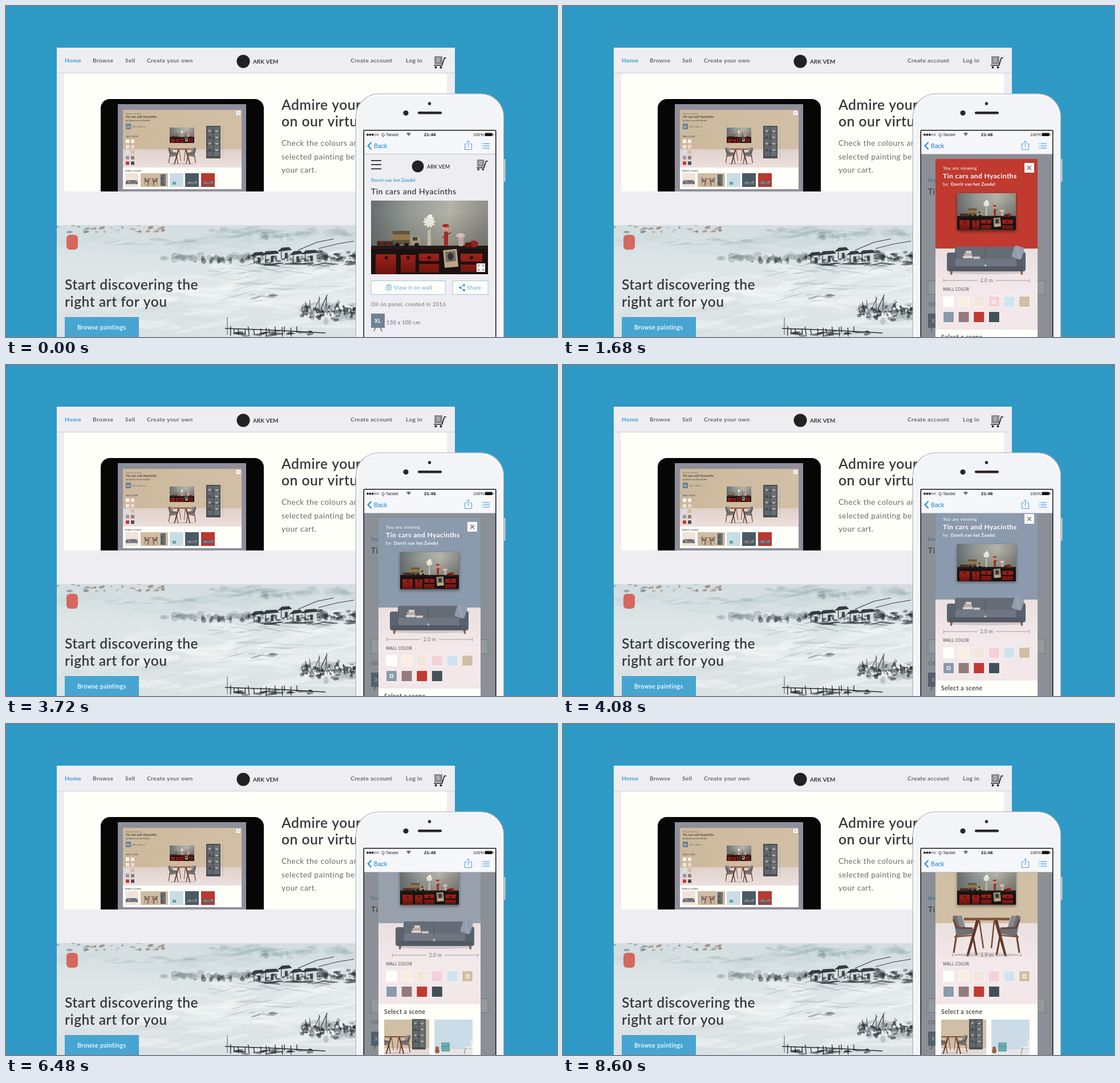
These frames come from a looping animation (966x580 px, 8.64 s). An HTML page with a canvas:

```html
<!DOCTYPE html>
<html lang="en">
<head>
<meta charset="utf-8">
<title>Art shop preview</title>
<style>
html, body { margin: 0; width: 100%; height: 100%; overflow: hidden; background: #2f9ac6; }
canvas { display: block; width: 966px; height: 580px; }
</style>
</head>
<body>
<canvas id="stage" width="966" height="580"></canvas>
<script>
const W = 966, H = 580, LOOP = 8640;
const BRAND = 'ARK VEM', ARTIST = 'Dorrit van het Zandel', TITLE = 'Tin cars and Hyacinths';
const SANS = 'Lato, sans-serif', SYSTEM = '"Liberation Sans", sans-serif';
const PAGE = '#ededf2', IVORY = '#fffff9', BLUE = '#3a9bd0', LINK = '#57a6d8';
const RED = [192, 58, 48], PINK = [243, 209, 216], SLATE = [139, 154, 173], TAN = [208, 191, 164];
const SWATCHES = ['#fffffa', '#fbeee0', '#f4e5dd', '#f3d1d8', '#cfe4ef', '#d0bfa4',
  '#8b9aad', '#957a7c', '#c03a30', '#444f58'];

const stage = document.getElementById('stage').getContext('2d');
let g = stage;

function newLayer() {
  const c = document.createElement('canvas');
  c.width = W; c.height = H;
  return c.getContext('2d');
}
function rect(x, y, w, h, fill, r = 0) {
  g.fillStyle = fill;
  g.beginPath();
  g.roundRect(x, y, w, h, r);
  g.fill();
}
function frame(x, y, w, h, color, lw = 1, r = 0) {
  g.strokeStyle = color;
  g.lineWidth = lw;
  g.beginPath();
  g.roundRect(x, y, w, h, r);
  g.stroke();
}
function oval(x, y, rx, ry, fill, turn = 0) {
  g.fillStyle = fill;
  g.beginPath();
  g.ellipse(x, y, rx, ry, turn, 0, 7);
  g.fill();
}
function trace(p) {
  g.beginPath();
  for (let i = 0; i < p.length; i += 2) g.lineTo(p[i], p[i + 1]);
}
function line(color, lw, ...p) {
  g.strokeStyle = color;
  g.lineWidth = lw;
  trace(p);
  g.stroke();
}
function poly(fill, ...p) {
  g.fillStyle = fill;
  trace(p);
  g.fill();
}
function text(s, x, y, size, color, weight = 400, gap = 0.035, family = SANS) {
  g.font = `${weight} ${size}px ${family}`;
  g.letterSpacing = size * gap + 'px';
  g.fillStyle = color;
  g.fillText(s, x, y);
}
function fade(x0, y0, x1, y1, ...colors) {
  const f = g.createLinearGradient(x0, y0, x1, y1);
  colors.forEach((c, i) => f.addColorStop(i / (colors.length - 1), c));
  return f;
}
function at(x, y, s, draw) {
  g.save();
  g.translate(x, y);
  g.scale(s, s);
  draw();
  g.restore();
}
function clip(x, y, w, h, draw) {
  g.save();
  g.beginPath();
  g.rect(x, y, w, h);
  g.clip();
  draw();
  g.restore();
}
const ease = (t, a, b) => {
  const p = Math.min(1, Math.max(0, (t - a) / (b - a)));
  return p * p * (3 - 2 * p);
};
const mix = (a, b, p) => a.map((v, i) => v + (b[i] - v) * p);
const rgb = c => `rgb(${c.map(Math.round)})`;
function seeded(s) {
  return () => (s = (s * 16807) % 2147483647) / 2147483647;
}

function cart() {
  rect(1, 0, 14, 14, '#8b8b8d');
  text('0', 5, 10, 9, '#fff', 400, 0);
  line('#222', 1.7, 22, 3, 18.5, 3, 14.5, 16, 0, 16);
  oval(3.5, 19.5, 1.9, 1.9, '#222');
  oval(12.5, 19.5, 1.9, 1.9, '#222');
}

// Still life, 205 x 129
function photo() {
  clip(0, 0, 205, 129, () => {
    rect(0, 0, 205, 129, fade(0, 0, 205, 40, '#656c6e', '#959a95', '#b3b3a7', '#8a8984'));
    rect(0, 0, 205, 82, fade(0, 20, 0, 82, 'rgba(60,60,55,0)', 'rgba(60,60,55,.3)'));
    rect(0, 82, 205, 47, '#191211');
    const red = fade(0, 90, 0, 129, '#a3241a', '#6a130e');
    rect(8, 94, 36, 35, red);
    rect(52, 95, 26, 31, red);
    rect(84, 93, 35, 13, red);
    rect(84, 111, 35, 15, red);
    rect(157, 93, 38, 14, red);
    rect(157, 112, 38, 13, red);
    for (const x of [27, 65, 102, 176]) oval(x, 100, 3, 3, '#2b0f0c');
    rect(0, 79, 205, 6, '#231917');
    for (let i = 0; i < 5; i++) oval(14 + i * 6, 75, 4, 4.5, i % 2 ? '#6d2019' : '#30302c');
    rect(38, 53, 30, 24, '#5f543f');
    rect(38, 59, 30, 10, '#93754a');
    rect(69, 62, 18, 15, '#a2967b', 3);
    rect(73, 64, 8, 6, '#40443f');
    for (const x of [46, 62, 80]) oval(x, 78, 4, 4, '#1c1816');
    rect(97, 50, 10, 29, fade(97, 0, 107, 0, '#8d8d80', '#c9c6b7', '#8d8a7c'), 2);
    line('#8b957c', 2, 101, 52, 102, 33);
    for (let i = 0; i < 5; i++) oval(102, 37, 11, 3, '#e6e5d8', i * 1.25);
    oval(104, 28, 4, 4, '#f4f2e6');
    rect(128, 54, 7, 25, '#a32b21', 3);
    oval(131, 48, 4.5, 4.5, '#c79d83');
    oval(131, 44, 6, 3, '#a9291f');
    line('#a32b21', 2, 125, 65, 140, 56);
    rect(153, 62, 9, 18, '#bca7a2', 4);
    oval(157, 61, 8, 4, '#d8bab6');
    oval(180, 76, 8, 6, '#8e231b');
    oval(170, 78, 6, 5, '#62170f');
    g.save();
    g.rotate(-0.09);
    rect(118, 98, 24, 31, '#bfa684');
    rect(121, 101, 18, 18, '#6d7069');
    oval(130, 110, 5, 7, '#35322f');
    g.restore();
  });
}

// Sofa, 138 x 50
function sofa() {
  oval(69, 47, 66, 3, 'rgba(120,105,105,.25)');
  poly('#8d6750', 6, 42, 11, 42, 9, 51, 6, 51);
  poly('#8d6750', 128, 42, 133, 42, 133, 51, 130, 51);
  rect(14, 2, 110, 30, '#666c76', 4);
  line('#525861', 1, 67, 3, 67, 30);
  rect(0, 12, 17, 33, '#5d636e', 4);
  rect(121, 11, 17, 34, '#5a606b', 4);
  rect(15, 23, 52, 13, '#737984', 3);
  rect(68, 23, 54, 13, '#707681', 3);
  rect(4, 36, 130, 9, '#545a65', 2);
  g.save();
  g.translate(125, 11);
  g.rotate(0.3);
  rect(-9, -10, 18, 22, '#929cad', 4);
  line('#adb6c4', 1, -5, -8, 5, 10);
  g.restore();
  rect(28, 18, 17, 4, '#d9d3ce', 1);
  rect(30, 13, 14, 5, '#b9aaa3', 1);
  rect(33, 9, 10, 4, '#d7d1cc', 1);
  rect(46, 19, 12, 4, '#ccc5c1', 1);
}

function chair() {
  poly('#6c7075', 1, 2, 8, 0, 18, 21, 40, 24, 41, 32, 8, 37);
  poly('#85898d', 8, 1, 17, 1, 24, 23, 15, 24);
  line('#6d4330', 3, 2, 7, 9, 22, 36, 23);
  line('#6d4330', 3, 8, 34, 3, 66);
  line('#5f3a2a', 3, 36, 33, 43, 70);
  line('#855239', 2.5, 4, 38, 39, 35);
}

// Table with two chairs, 121 x 75
function table() {
  oval(60, 69, 56, 4, 'rgba(140,120,115,.2)');
  chair();
  g.save();
  g.translate(121, 0);
  g.scale(-1, 1);
  chair();
  g.restore();
  poly('#63382a', 42, 9, 48, 9, 29, 72, 25, 72);
  poly('#63382a', 74, 9, 80, 9, 96, 72, 92, 72);
  line('#7d4c36', 2.5, 48, 10, 55, 58);
  line('#7d4c36', 2.5, 74, 10, 69, 58);
  rect(21, 4.5, 80, 4.5, '#85533c', 1);
}

// Display cabinet, 25 x 57
function cabinet() {
  rect(0, 0, 25, 57, '#494e54');
  rect(2, 2, 10, 51, '#62686c');
  rect(13.5, 2, 10, 51, '#696e72');
  for (let i = 1; i < 5; i++) {
    line('#3a3f44', 1, 1, i * 11, 24, i * 11);
    rect(4, i * 11 - 4, 4, 4, i % 2 ? '#aaa096' : '#454b50');
    rect(16, i * 11 - 3, 5, 3, '#b2aca5');
  }
}

function ink() {
  const rnd = seeded(77);
  const spread = (n, x0, x1, y, dy, rx, ry, color, alpha) => {
    for (let i = 0; i < n; i++) {
      g.globalAlpha = alpha * (0.4 + rnd() * 0.6);
      oval(x0 + rnd() * (x1 - x0), y + (rnd() + rnd() - 1) * dy,
        rx * (0.3 + rnd()), ry * (0.3 + rnd()), color, (rnd() - 0.6) * 0.5);
    }
    g.globalAlpha = 1;
  };
  clip(89, 384, 698, 196, () => {
    rect(89, 384, 698, 196, fade(0, 384, 0, 580, '#d3dddf', '#dde5e6', '#e0e6e7', '#dbe2e3'));
    spread(40, 89, 640, 415, 25, 55, 5, '#bccdd0', 0.2);
    spread(60, 230, 640, 500, 80, 60, 6, '#f6f9f8', 0.4);
    spread(30, 89, 350, 550, 40, 45, 4, '#c6d1d3', 0.25);
    spread(45, 360, 610, 397, 9, 16, 4, '#93adab', 0.3);
    spread(20, 180, 360, 414, 6, 22, 2.5, '#8fa6a6', 0.25);
    spread(16, 440, 500, 403, 7, 6, 4, '#6f8c8c', 0.3);
    spread(24, 135, 280, 391, 9, 4.5, 2, '#8c705d', 0.75);
    spread(8, 89, 145, 391, 8, 5, 3, '#64777d', 0.6);
    spread(45, 270, 425, 441, 7, 7, 5, '#7b8a8c', 0.4);
    spread(26, 330, 425, 445, 6, 4.5, 4, '#343b3e', 0.6);
    spread(50, 540, 625, 440, 11, 6, 4, '#273034', 0.6);
    spread(30, 420, 620, 452, 3, 12, 1.5, '#252a2d', 0.6);
    spread(22, 360, 620, 462, 9, 22, 1.2, '#84979a', 0.4);
    spread(18, 380, 600, 495, 25, 22, 1.2, '#8fa0a2', 0.35);
    for (let i = 0; i < 5; i++) {
      const x = 428 + i * 23 + rnd() * 6, y = 430 - (i % 3) * 3 + rnd() * 5, w = 15 + rnd() * 9;
      rect(x + 2, y + 4, w, 13, '#d3dad9');
      poly('#353c40', x - 4, y + 5, x + 4, y - 2, x + w, y - 3, x + w + 5, y + 2, x + 6, y + 4);
      line('#293034', 1.2, x + 3, y + 4, x + 3, y + 18);
      rect(x + w * 0.55, y + 7, 5, 10, '#40494d');
    }
    spread(36, 425, 540, 444, 8, 4, 2.2, '#252c30', 0.65);
    line('#333b3f', 1.2, 512, 428, 545, 414, 575, 408);
    line('#333b3f', 1, 548, 425, 580, 417, 610, 412);
    // tree
    spread(26, 515, 612, 535, 20, 9, 6, '#7d8b8d', 0.4);
    for (let i = 0; i < 15; i++) {
      const x = 522 + i * 6, top = 506 + Math.abs(i - 6) * 3;
      line('#3d4649', 0.6 + rnd() * 0.8, x, 546 - rnd() * 8, x + rnd() * 8 - 8, 530, x + rnd() * 18 - 10, top);
    }
    spread(50, 516, 612, 537, 15, 4, 3, '#202629', 0.7);
    spread(12, 420, 470, 508, 4, 7, 1.5, '#626f72', 0.5);
    // jetty
    line('#262c2f', 1.5, 384, 565, 470, 568, 560, 573);
    for (let i = 0; i < 14; i++) {
      const x = 388 + i * 9 + rnd() * 6;
      line('#22282b', 1.3, x, 561 + rnd() * 5, x - 1 + rnd() * 3, 572 + rnd() * 8);
    }
    line('#50595b', 1, 388, 546, 388, 576);
    spread(30, 400, 535, 574, 5, 8, 2, '#252b2e', 0.65);
    rect(106, 401, 20, 26, '#d4685e', 6);
  });
}

function tablet() {
  rect(166, 163, 286, 190, '#060606', 16);
  rect(196, 172, 225, 153, '#8f8f9b');
  rect(205, 182, 208, 100, fade(205, 0, 413, 0, '#ccb89c', '#d1bfa6'));
  rect(205, 251, 208, 32, fade(0, 251, 0, 283, '#dfd1ca', '#ecdfdd'));
  rect(205, 283, 208, 38, IVORY);
  text('You are viewing', 210, 190, 3.6, '#6b6257');
  text(TITLE, 210, 196, 5, '#3e3a36', 700);
  text('by ' + ARTIST, 210, 201.5, 3.6, '#4e4944', 700);
  rect(210, 206, 9, 10, '#6d8296');
  text('XL', 212, 213, 4, '#fff', 700);
  text('150 x 100 cm', 221, 213, 3.6, '#555');
  text('WALL COLOR', 210, 230, 3.2, '#555', 700);
  SWATCHES.forEach((c, i) => rect(210 + (i % 2) * 9, 234 + (i >> 1) * 9.6, 6, 6, c));
  rect(404, 184, 7, 7, '#fff');
  line('#777', 0.7, 406, 186, 409, 189);
  line('#777', 0.7, 409, 186, 406, 189);
  at(287, 213, 43 / 205, photo);
  at(351, 210, 1, cabinet);
  at(284, 248, 0.41, table);
  line('#aaa', 0.5, 285, 277, 332, 277);
  line('#aaa', 0.6, 380, 211, 380, 267);
  text('Select a scene', 209, 290, 4.2, '#333', 700);
  rect(209, 293, 23, 24, '#f1e3da');
  at(210, 305, 0.15, sofa);
  rect(236, 293, 48, 24, '#cfbca1');
  at(242, 301, 0.2, table);
  at(271, 295, 0.35, cabinet);
  rect(287, 293, 24, 24, '#c9dce6');
  rect(292, 308, 6, 5, '#62a4a7');
  rect(314, 293, 24, 24, '#4b5963');
  at(316, 307, 0.14, sofa);
  rect(342, 293, 24, 24, '#b9382f');
  at(344, 307, 0.14, sofa);
}

function desktop() {
  rect(0, 0, W, H, '#2f9ac6');
  rect(89, 73, 698, 507, PAGE);
  rect(89, 117, 698, 1, '#c9cfd8');
  rect(102, 118, 671, 207, IVORY);
  const nav = [['Home', 103], ['Browse', 152], ['Sell', 209], ['Create your own', 247],
    ['Create account', 604], ['Log in', 701]];
  nav.forEach(([s, x], i) => text(s, x, 99, 10.2, i ? '#68686c' : BLUE, 700));
  oval(416, 97, 11.5, 11.5, '#222');
  text(BRAND, 433, 101, 10, '#222', 600, 0);
  at(750, 88, 1, cart);
  clip(102, 118, 671, 207, tablet);
  text('Admire your', 483, 182, 24.6, '#38383a', 600, 0.02);
  text('on our virtual', 483, 211, 24.6, '#38383a', 600, 0.02);
  text('Check the colours and', 483, 245, 13.6, '#6a6a6d');
  text('selected painting before', 483, 269, 13.6, '#6a6a6d');
  text('your cart.', 483, 292, 13.6, '#6a6a6d');
  ink();
  text('Start discovering the', 103, 497, 24.6, '#38383a', 600, 0.02);
  text('right art for you', 103, 527, 24.6, '#38383a', 600, 0.02);
  rect(103, 545, 130, 35, '#47a5d2');
  text('Browse paintings', 125, 567, 10.5, '#fff', 600);
}

function phone() {
  rect(872, 268, 3.5, 40, '#c9cdd3', 1);
  rect(613, 153.5, 260, 480, '#f3f4f8', 40);
  frame(613.5, 154, 259, 480, '#a5abb3', 1.2, 40);
  frame(615.5, 156, 255, 480, '#fff', 2, 38);
  oval(742.5, 171, 2.7, 2.7, '#222');
  oval(701, 187.5, 4.6, 4.6, '#2b2727');
  rect(722, 185, 42, 4.5, '#2b2727', 2.2);
  rect(626.5, 217, 233, 400, '#111', 2);
  rect(628, 218.5, 230, 380, '#f6f7fa');
  for (let i = 0; i < 5; i++) {
    if (i < 3) oval(634 + i * 4.4, 225.5, 1.9, 1.9, '#222');
    else frame(632.4 + i * 4.4, 223.9, 3.2, 3.2, '#222', 0.6, 1.6);
  }
  text('Q-Tandel', 658, 228, 7.3, '#222', 400, 0, SYSTEM);
  g.strokeStyle = '#222';
  g.lineWidth = 1.2;
  for (const r of [1.5, 3.5, 5.5]) {
    g.beginPath();
    g.arc(706, 228, r, -2.3, -0.84);
    g.stroke();
  }
  text('21:48', 733, 228, 7.8, '#111', 700, 0.01, SYSTEM);
  text('100%', 819, 228, 7.3, '#222', 400, 0.01, SYSTEM);
  rect(839.5, 222.5, 13, 5.5, '#111', 1);
  rect(853, 224, 1.3, 2.5, '#111');
  line('#147ee0', 1.8, 640.5, 239, 634.5, 245, 640.5, 251);
  text('Back', 645, 249, 10.4, '#147ee0', 400, 0, SYSTEM);
  line('#4b9ae4', 1, 808, 241.5, 804.5, 241.5, 804.5, 251.5, 816.5, 251.5, 816.5, 241.5, 813, 241.5);
  line('#4b9ae4', 1, 810.5, 247, 810.5, 236);
  line('#4b9ae4', 1, 807.5, 239, 810.5, 236, 813.5, 239);
  for (const y of [241, 245, 249]) {
    rect(834, y - 0.5, 1.5, 1.2, '#4b9ae4');
    rect(837, y - 0.5, 11, 1.2, '#4b9ae4');
  }
  rect(628, 259, 230, 1, '#bfc1c6');
}

function product(shade) {
  rect(628, 260, 230, 320, PAGE);
  g.globalAlpha = 1 - shade;
  for (const y of [270, 277, 284.5]) rect(640, y, 18, 1.7, '#222');
  oval(722, 281, 10.5, 10.5, '#222');
  text(BRAND, 738, 285, 9.1, '#222', 500, 0);
  at(825, 269, 0.9, cart);
  at(640, 341, 1, photo);
  rect(825, 451, 15, 15, '#fff');
  for (const [x, y, a, b] of [[828, 454, 1, 1], [837, 454, -1, 1], [828, 463, 1, -1], [837, 463, -1, -1]])
    line('#444', 1, x + a * 3, y, x, y, x, y + b * 3);
  g.globalAlpha = 1;
  text(ARTIST, 640, 308, 7.6, BLUE, 700);
  text(TITLE, 640, 330, 14, '#1c1c1e');
  for (const [x, w] of [[640, 130], [783, 62]]) {
    rect(x, 481, w, 24, IVORY);
    frame(x, 481.5, w, 24, '#9cc5df');
  }
  frame(666.5, 490.5, 9, 7, LINK, 1, 1);
  line(LINK, 1, 668, 490, 671, 487.5, 674, 490);
  oval(671, 494, 1.6, 1.6, LINK);
  text('View it on wall', 680, 497, 9.6, LINK);
  line(LINK, 1.2, 803, 489, 796, 493.5, 803, 498);
  for (const [x, y] of [[803, 489], [796, 493.5], [803, 498]]) oval(x, y, 2, 2, BLUE);
  text('Share', 808, 497, 9.6, LINK);
  text('Oil on panel, created in 2016', 640, 526, 9.6, '#747478');
  line('#59646e', 1.5, 648, 563, 645, 570);
  line('#59646e', 1.5, 656, 563, 659, 570);
  rect(640, 539, 24, 25, '#6d8296');
  text('XL', 646, 555, 9, '#fff', 700);
  text('150 x 100 cm', 667, 558, 9.2, '#68686c');
  g.globalAlpha = shade;
  rect(628, 260, 230, 320, 'rgba(60,70,75,.55)');
  g.globalAlpha = 1;
}

function measure(x0, x1, y, label) {
  const m = (x0 + x1) / 2, c = '#a09a9b';
  for (const x of [x0, x1]) line(c, 1, x, y - 3, x, y + 3);
  line(c, 1, x0, y, m - 16, y);
  line(c, 1, m + 16, y, x1, y);
  text(label, m - 11, y + 3, 8.5, '#727073');
}

function scenes(shift) {
  clip(663, 593, 159, 90, () => {
    g.translate(663 - shift, 594);
    rect(0, 0, 104, 80, '#f7e9e1');
    rect(0, 52, 104, 30, '#eee2df');
    line('#c9a084', 1.3, 77, 13, 77, 60);
    poly('#d9b399', 74, 8, 80, 8, 83, 17, 71, 17);
    at(2, 32, 0.44, sofa);
    rect(113, 0, 79, 80, '#cfbfa6');
    rect(113, 50, 79, 30, '#e6dad3');
    at(104, 27, 0.46, table);
    at(162, -2, 0.95, cabinet);
    rect(201, 0, 67, 80, '#cbdbe7');
    rect(201, 52, 67, 30, '#e8e5e7');
    rect(213, 40, 15, 16, '#6ca9ac', 1);
    line('#4d8c92', 1, 213, 47, 228, 47);
    oval(206, 50, 3, 3, '#9b6246');
    oval(206, 55, 4, 4, '#9b6246');
    line('#f3f3f3', 2, 254, 48, 267, 48, 265, 34);
    line('#a5826a', 1.2, 256, 49, 253, 61);
    rect(277, 0, 80, 80, '#4b5963');
  });
}

function modal(t) {
  const scroll = 76 * ease(t, 3900, 4560);
  const slide = 179 * ease(t, 6360, 7200);
  const toPink = ease(t, 1700, 2150), toSlate = ease(t, 2800, 3250), toTan = ease(t, 6320, 6920);
  const wall = mix(mix(mix(RED, PINK, toPink), SLATE, toSlate), TAN, toTan);
  const label = rgb(mix([255, 255, 255], [72, 68, 70], toPink * (1 - toSlate)));
  const picked = t < 1680 ? 8 : t < 2780 ? 3 : t < 6300 ? 6 : 5;

  clip(653, 260, 179, 320, () => {
    g.translate(0, -scroll);
    rect(653, 268, 179, 157, rgb(wall));
    rect(653, 425, 179, 142, fade(0, 425, 0, 567, '#e9dfdf', '#f3e9ea', '#f2e6e9'));
    rect(653, 567, 179, 120, IVORY);
    text('You are viewing', 666, 287, 8.1, label);
    text(TITLE, 666, 302, 12, label, 700);
    text('by:', 666, 315, 7.6, label);
    text(ARTIST, 680, 315, 7.6, label, 700);
    rect(809, 275, 17, 17, IVORY);
    line('#666', 1.4, 814, 280, 821, 287);
    line('#666', 1.4, 821, 280, 814, 287);

    g.save();
    g.globalAlpha = ease(t, 1150, 1600);
    g.shadowColor = 'rgba(0,0,0,.45)';
    g.shadowBlur = 5;
    g.shadowOffsetY = 2;
    rect(691, 328, 103, 65, '#555');
    g.shadowColor = 'transparent';
    at(691, 328, 103 / 205, photo);
    g.restore();

    at(slide, 0, 1, () => {
      at(673, 420, 1, sofa);
      measure(667.5, 817.5, 481, '2.0 m');
    });
    at(slide - 179, 0, 1, () => {
      at(682, 411, 1, table);
      measure(683, 803, 481, '1.9 m');
    });

    text('WALL COLOR', 666, 499, 6.9, '#5d585b', 600);
    SWATCHES.forEach((c, i) => {
      const x = 666 + (i % 6) * 26.6, y = i < 6 ? 508 : 535;
      rect(x, y, 20, 20, '#fbf5f3');
      rect(x + 1, y + 1, 18, 18, c);
      if (i === picked) frame(x + 7.5, y + 7.5, 5, 5, '#fff', 1.3);
    });
    text('Select a scene', 663, 584, 10.8, '#2a2a2c', 500);
    scenes(113 * ease(t, 5000, 5700));
  });
}

const base = newLayer(), sheet = newLayer();
g = base;
desktop();
phone();

function render(now) {
  const t = Math.floor((now % LOOP) / 40) * 40;
  g = stage;
  g.drawImage(base.canvas, 0, 0);
  clip(628, 260, 230, 320, () => product(ease(t, 40, 480)));
  const alpha = ease(t, 480, 1200);
  if (alpha > 0) {
    g = sheet;
    g.clearRect(0, 0, W, H);
    modal(t);
    g = stage;
    g.globalAlpha = alpha;
    g.drawImage(sheet.canvas, 0, 0);
    g.globalAlpha = 1;
  }
}

const start = performance.now();
function tick() {
  render(performance.now() - start);
  requestAnimationFrame(tick);
}
tick();
</script>
</body>
</html>
```
